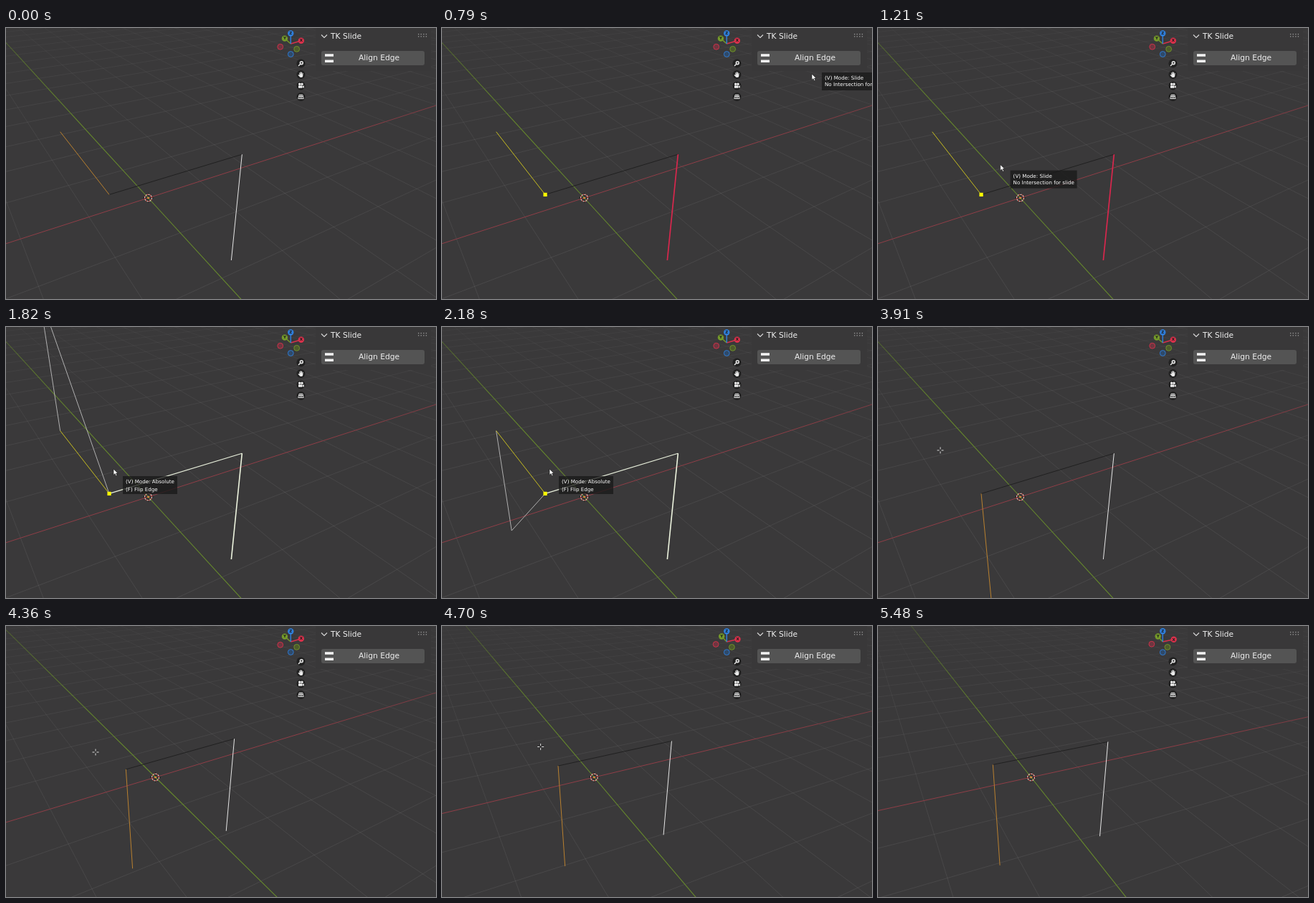
Write an HTML page with a canvas that moves like this. It is 600x378 px and loops after 5.58 s.

```html
<!DOCTYPE html>
<html lang="en">
<head>
<meta charset="utf-8">
<title>Align Edge</title>
<style>
  html, body { margin: 0; width: 100%; height: 100%; overflow: hidden; background: #3a393a; }
  body { font: 10.7px/13px "DejaVu Sans", sans-serif; color: #f0f0f0; }
  #stage { position: relative; width: 600px; height: 378px; overflow: hidden; }
  #stage > * { position: absolute; }
  canvas { left: 0; top: 0; width: 600px; height: 378px; }
  #panel { left: 432px; top: 0; width: 161px; height: 60px; background: #393839; }
  #panel * { position: absolute; white-space: nowrap; }
  #title { left: 21px; top: 5px; }
  #button { left: 8px; top: 32px; width: 144px; height: 20px; border-radius: 3px; background: #545454; }
  #label { left: 52px; top: 3px; }
  #panel svg { left: 0; top: 0; }
  #tip { padding: 0 4px; height: 25px; background: rgba(24, 24, 24, .76); font-size: 7.13px; color: #fff; white-space: pre; }
  #tip div { position: absolute; left: 4px; line-height: 10px; }
  #tip .wide { position: static; visibility: hidden; }
  #arrow, #cross { left: 0; top: 0; overflow: visible; }
</style>
</head>
<body>
<div id="stage">
  <canvas id="view"></canvas>
  <div id="panel">
    <span id="title">TK Slide</span>
    <div id="button"><span id="label">Align Edge</span></div>
    <svg width="161" height="60">
      <path d="M8 9.5l4 4 4-4" fill="none" stroke="#d5d5d5" stroke-width="1.2"/>
      <path d="M143 8.7h13M143 11.9h13" stroke="#a0a0a0" stroke-width="1.3" stroke-dasharray="1.3 2.3"/>
      <path d="M13 36.2h12v3.6h-12zM13 44.4h12v3.6h-12z" fill="#f4f4f4"/>
    </svg>
  </div>
  <div id="tip"><div class="wide"></div><div class="one"></div><div class="two"></div></div>
  <svg id="arrow" width="8" height="12"><path d="M0 0v8.4l2-1.8 1.5 3.2 1.5-.7-1.5-3h2.6z" fill="#fff" stroke="#111" stroke-width=".6"/></svg>
  <svg id="cross" width="1" height="1">
    <path d="M-4.5 0h3M1.5 0h3M0-4.5v3M0 1.5v3" stroke="#111" stroke-width="2.2" opacity=".5"/>
    <path d="M-4.5 0h3M1.5 0h3M0-4.5v3M0 1.5v3" stroke="#f2f2f2"/>
  </svg>
</div>
<script>
const LOOP = 5580, W = 600, H = 378;
const FOCAL = 560, CX = 231, CY = 193;
const $ = s => document.querySelector(s);
const canvas = $('#view'), ctx = canvas.getContext('2d');
const scale = window.devicePixelRatio || 1;
canvas.width = W * scale;
canvas.height = H * scale;

// time, yaw, pitch, origin x, origin y, origin depth
const CAMERA = [
  [4040, 60.05, 30.4, 198.5, 237, 6.464],
  [4330, 60.05, 30.4, 208.5, 211, 7.6],
  [4420, 60.05, 30.4, 208.5, 211, 7.6],
  [4840, 66.65, 28.85, 213.6, 211, 7.65]
];
// time, pointer x, y, tooltip offset x, y
const POINTER = [
  [180, 462, 104, 14, -2], [420, 512, 45, 14, -2], [640, 513, 47, 14, -2],
  [790, 516, 64, 14, -2], [860, 512, 68, 14, 0], [1160, 172, 190, 14, 8],
  [1500, 150, 198, 13, 10], [2300, 150, 198, 13, 10], [2600, 82, 158, 7, 8],
  [2850, 81, 160, 5, 7], [3400, 84, 168, 5, 7], [3660, 87, 172, 5, 7],
  [4040, 87, 172, 5, 7], [4330, 125, 176, 5, 7], [4420, 125, 176, 5, 7], [4840, 142, 166, 5, 7]
];
// time, mode, marked end, direction
const STATES = [
  [0, 'idle'], [640, 'slide', 'A'], [1330, 'absolute', 'A', 1], [2070, 'absolute', 'A', -1],
  [2480, 'absolute', 'D', -1], [2700, 'absolute', 'D', 1], [3280, 'absolute', 'D', -1], [3660, 'done']
];
const TIPS = {
  slide: ['(V) Mode: Slide', 'No Intersection for slide', 9.3],
  absolute: ['(V) Mode: Absolute', '(F) Flip Edge', 10.8]
};
const A = [-1, -1, 1], B = [1, -1, 1], C = [1, -1, -1], D = [-1, 1, 1], END = [-1, -1, -1];

function sample(track, t) {
  if (t <= track[0][0]) return track[0].slice(1);
  for (let i = 1; i < track.length; i++) {
    const p = track[i - 1], q = track[i];
    if (t < q[0]) {
      const k = (t - p[0]) / (q[0] - p[0]), e = k * k * (3 - 2 * k);
      return p.slice(1).map((v, j) => v + (q[j + 1] - v) * e);
    }
  }
  return track[track.length - 1].slice(1);
}

function makeCamera([yaw, pitch, ox, oy, depth]) {
  const a = yaw * Math.PI / 180, b = pitch * Math.PI / 180;
  const sa = Math.sin(a), ca = Math.cos(a), sb = Math.sin(b), cb = Math.cos(b);
  const axes = [[sa, -ca * sb, ca * cb], [-ca, -sa * sb, sa * cb], [0, -cb, -sb]];
  const origin = [(ox - CX) / FOCAL * depth, (oy - CY) / FOCAL * depth, depth];
  const height = -origin.reduce((s, v, i) => s + v * axes[2][i], 0);
  const toView = p => origin.map((v, i) => v + p[0] * axes[0][i] + p[1] * axes[1][i] + p[2] * axes[2][i]);
  return { axes, height, toView };
}

const toScreen = v => [CX + FOCAL * v[0] / v[2], CY + FOCAL * v[1] / v[2]];

// Screen ends of a segment after near-plane clipping, or null when it is out of sight
function clip(p, q) {
  const near = .1;
  if (p[2] < near && q[2] < near) return null;
  const cut = (u, v) => {
    if (u[2] >= near) return u;
    const k = (near - u[2]) / (v[2] - u[2]);
    return u.map((c, i) => c + (v[i] - c) * k);
  };
  const s = toScreen(cut(p, q)), e = toScreen(cut(q, p));
  const out = (i, max) => (s[i] < 0 && e[i] < 0) || (s[i] > max && e[i] > max);
  return out(0, W) || out(1, H) ? null : [s, e];
}

function stroke(points, color, width) {
  ctx.beginPath();
  points.forEach(p => ctx.lineTo(p[0], p[1]));
  ctx.strokeStyle = color;
  ctx.lineWidth = width;
  ctx.stroke();
}

function disc(x, y, r, fill, line) {
  ctx.beginPath();
  ctx.arc(x, y, r, 0, 7);
  ctx.fillStyle = fill;
  ctx.fill();
  if (line) { ctx.strokeStyle = line; ctx.lineWidth = .9; ctx.stroke(); }
}

function drawFloorLine(cam, at, color, width, strength) {
  const R = 32, STEP = 2;
  for (let s = -R; s < R; s += STEP) {
    const p = cam.toView(at(s)), q = cam.toView(at(s + STEP));
    const seg = clip(p, q);
    if (!seg) continue;
    const dist = Math.hypot(...p.map((v, i) => (v + q[i]) / 2));
    const slant = 1 - Math.min(1, cam.height / dist);
    const fade = (1 - slant ** 4) * Math.max(0, 1 - dist / 45);
    ctx.globalAlpha = Math.min(1, strength * fade);
    stroke(seg, color, width);
  }
  ctx.globalAlpha = 1;
}

function drawFloor(cam) {
  for (let n = -30; n <= 30; n++) {
    if (!n) continue;
    drawFloorLine(cam, s => [s, n, 0], '#fff', 1, .085);
    drawFloorLine(cam, s => [n, s, 0], '#fff', 1, .085);
  }
  drawFloorLine(cam, s => [s, 0, 0], '#8f3e47', 1, 1.4);
  drawFloorLine(cam, s => [0, s, 0], '#66892c', 1.1, 1.4);
}

function drawCursor3D(cam) {
  const [x, y] = toScreen(cam.toView([0, 0, 0]));
  disc(x, y, 1.3, '#e59a3c');
  for (const [dx, dy] of [[1, 0], [-1, 0], [0, 1], [0, -1]])
    stroke([[x + dx * 2.8, y + dy * 2.8], [x + dx * 7, y + dy * 7]], '#151515', .9);
  const arc = Math.PI / 8;
  for (let i = 0; i < 16; i++) {
    ctx.beginPath();
    ctx.arc(x, y, 4.9, i * arc, (i + 1) * arc);
    ctx.strokeStyle = i % 2 ? '#d8483f' : '#ece5dc';
    ctx.lineWidth = 1.1;
    ctx.stroke();
  }
}

function drawEdges(cam, [, mode, mark, dir]) {
  const edge = (p, q, color, width) => {
    const seg = clip(cam.toView(p), cam.toView(q));
    if (seg) stroke(seg, color, width);
  };
  if (mode === 'idle' || mode === 'done') {
    edge(A, B, '#1e1e1e', .9);
    edge(B, C, '#e6e6e6', 1);
    edge(A, mode === 'idle' ? D : END, '#b9802f', 1);
    return;
  }
  if (mode === 'slide') {
    edge(A, B, '#1e1e1e', .9);
    edge(B, C, '#d9274d', 1.7);
  } else {
    const base = mark === 'A' ? D : A;
    const tip = [base[0], base[1], base[2] + 2 * dir];
    edge(A, B, '#e9f0dc', 1.2);
    edge(B, C, '#eef5e0', 1.6);
    edge(A, tip, '#bdbdbd', .9);
    edge(D, tip, '#bdbdbd', .9);
  }
  edge(A, D, '#d6cc1e', .9);
  const [x, y] = toScreen(cam.toView(mark === 'A' ? A : D));
  ctx.fillStyle = '#ffff00';
  ctx.fillRect(x - 2.6, y - 2.6, 5.2, 5.2);
}

function drawGizmo(cam) {
  const x = 397.3, y = 22, R = 16.8;
  const colors = ['#d9314b', '#74992a', '#2f7fdc'];
  const dim = ['#6e3640', '#4d5b2c', '#2f4a6a'];
  const balls = cam.axes.flatMap((a, i) => [1, -1].map(s => ({ a: a.map(v => v * s), i, s })));
  balls.sort((p, q) => q.a[2] - p.a[2]);
  ctx.font = 'bold 5.5px "DejaVu Sans", sans-serif';
  ctx.textAlign = 'center';
  ctx.textBaseline = 'middle';
  for (const { a, i, s } of balls) {
    const bx = x + a[0] * R, by = y + a[1] * R;
    if (s > 0) {
      stroke([[x, y], [bx, by]], colors[i], 1.4);
      disc(bx, by, 4.2, colors[i]);
      ctx.fillStyle = '#1b1b1b';
      ctx.fillText('XYZ'[i], bx, by + .3);
    } else disc(bx, by, 3.9, dim[i], colors[i]);
  }
}

function drawButtons() {
  const x = 411.5, ink = '#ececec';
  for (const y of [49.5, 65, 80.5, 96]) disc(x, y, 6, '#202020');
  // zoom
  disc(x + .8, 48.7, 2.7, ink);
  stroke([[x - 1, 50.5], [x - 3.5, 53]], ink, 1.5);
  stroke([[x - .7, 48.7], [x + 2.3, 48.7]], '#202020', .8);
  stroke([[x + .8, 47.2], [x + .8, 50.2]], '#202020', .8);
  // hand
  disc(x + .3, 66.4, 2.5, ink);
  for (const [dx, top] of [[-1.7, 62.2], [-.2, 61.3], [1.3, 61.8], [2.7, 63]])
    stroke([[x + dx, top], [x + dx * .8, 66]], ink, 1.1);
  stroke([[x - 3.7, 65.6], [x - 1, 67.6]], ink, 1.2);
  // camera
  disc(x - 1.8, 78.3, 1.7, ink);
  disc(x + 1.5, 78.3, 1.7, ink);
  ctx.fillStyle = ink;
  ctx.fillRect(x - 3.5, 80.3, 5.5, 3.4);
  stroke([[x + 2, 82], [x + 4, 80.7], [x + 4, 83.3], [x + 2, 82]], ink, .9);
  // grid
  for (const [y, half] of [[93.2, 2.4], [95.6, 3], [98.6, 3.8]])
    stroke([[x - half, y], [x + half, y]], ink, .9);
  for (const k of [-1, -.33, .33, 1])
    stroke([[x + 2.4 * k, 93.2], [x + 3.8 * k, 98.6]], ink, .9);
}

function show(el, on, x, y) {
  el.style.display = on ? 'block' : 'none';
  if (on) el.style.transform = `translate(${x}px, ${y}px)`;
}

function drawOverlay(t, mode) {
  const [x, y, dx, dy] = sample(POINTER, t);
  const busy = mode === 'slide' || mode === 'absolute';
  show($('#arrow'), busy || (mode === 'idle' && t >= 180), x, y);
  show($('#cross'), mode === 'done' && t < 4850, x, y);
  show($('#tip'), busy, x + dx, y + dy);
  const over = mode === 'idle' && t > 180 && y > 32 && y < 52;
  $('#button').style.background = over ? '#656565' : '#545454';
  if (!busy) return;
  const [one, two, gap] = TIPS[mode];
  const top = 3;
  $('#tip .wide').textContent = one.length > two.length ? one : two;
  $('#tip .one').textContent = one;
  $('#tip .two').textContent = two;
  $('#tip .one').style.top = top + 'px';
  $('#tip .two').style.top = top + gap + 'px';
}

function render(t) {
  const state = STATES.filter(s => s[0] <= t).pop();
  const cam = makeCamera(sample(CAMERA, t));
  ctx.setTransform(scale, 0, 0, scale, 0, 0);
  ctx.fillStyle = '#3a393a';
  ctx.fillRect(0, 0, W, H);
  drawFloor(cam);
  drawEdges(cam, state);
  drawCursor3D(cam);
  drawGizmo(cam);
  drawButtons();
  drawOverlay(t, state[1]);
}

const start = performance.now();
function tick() {
  render((performance.now() - start) % LOOP);
  requestAnimationFrame(tick);
}
tick();
</script>
</body>
</html>
```
